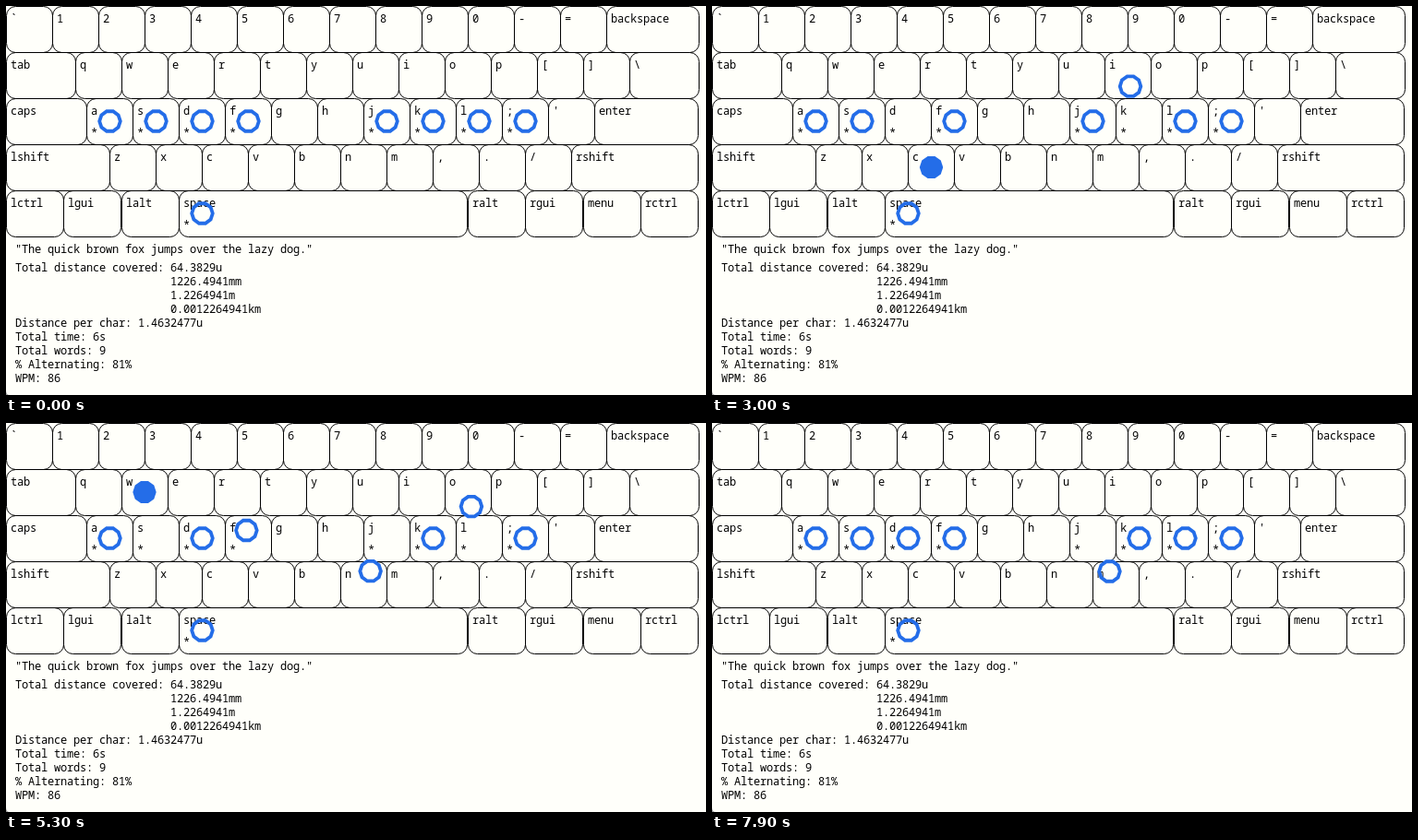
Write an HTML page with a canvas that moves like this. It is 758 px wide and 422 px high and loops after 8 s.

```html
<!DOCTYPE html>
<html lang="en">
<head>
<meta charset="utf-8">
<title>Typing simulation</title>
<style>
html, body { margin: 0; width: 758px; height: 422px; overflow: hidden; background: #fffffa; }
canvas { display: block; }
</style>
</head>
<body>
<canvas id="stage" width="758" height="422"></canvas>
<script>
const ctx = document.getElementById('stage').getContext('2d');
const LOOP = 8000, UNIT = 50, BLUE = '#246de8';

// Each row: key names; "name:width" when wider than one unit.
const rows = [
  '` 1 2 3 4 5 6 7 8 9 0 - = backspace:2',
  'tab:1.5 q w e r t y u i o p [ ] \\:1.5',
  "caps:1.75 a s d f g h j k l ; ' enter:2.25",
  'lshift:2.25 z x c v b n m , . / rshift:2.75',
  'lctrl:1.25 lgui:1.25 lalt:1.25 space:6.25 ralt:1.25 rgui:1.25 menu:1.25 rctrl:1.25'
];
const keys = {};
rows.forEach((row, r) => {
  let x = 0;
  for (const item of row.split(' ')) {
    const [name, size = 1] = item.split(':');
    const w = size * UNIT;
    keys[name] = { x, y: r * UNIT, w, cx: x + 25, cy: r * UNIT + 25 };
    x += w;
  }
});

const fingers = ['a', 's', 'd', 'f', 'j', 'k', 'l', ';', 'space'];
const reach = { a: 'q', s: 'wx', d: 'ec', f: 'rtb', j: 'hunm', k: 'i', l: 'o' };
const fingerOf = key => fingers.includes(key) ? key
  : key === 'rshift' ? ';' : fingers.find(f => (reach[f] || '').includes(key));
const handOf = f => f === 'space' ? 'thumb' : 'asdf'.includes(f) ? 'left' : 'right';

// Motion plan: speed in px/ms, times in ms.
const SPEED = 0.142, HOLD = 150, GAP = 188, LAG = 25, START = 46;

function makeMove(key) {
  const finger = fingerOf(key), home = keys[finger], to = keys[key];
  return { key, finger, home, to, travel: Math.hypot(to.cx - home.cx, to.cy - home.cy) / SPEED };
}
function schedule(move, start) {
  move.start = start;
  move.press = start + move.travel;
  release(move, move.press + HOLD);
}
function release(move, time) {
  move.release = time;
  move.end = time + move.travel;
}

function plan(text) {
  const shift = makeMove('rshift'), moves = [shift];
  schedule(shift, START);
  let prev = shift;
  for (const ch of text) {
    const move = makeMove(ch === ' ' ? 'space' : ch);
    const last = moves.filter(m => m.finger === move.finger).pop();
    const sameHand = handOf(prev.finger) === handOf(move.finger);
    let start;
    if (prev === shift) start = shift.press + LAG;
    else if (sameHand) start = prev.release + LAG;
    else start = prev.press + GAP - move.travel;
    // A finger must be back home before it sets off again.
    if (last && last.end > start) start = last.end + LAG;
    schedule(move, start);
    if (prev === shift) release(shift, move.press);
    moves.push(move);
    prev = move;
  }
  return moves;
}
const moves = plan('the quick brown fox jum');

function drawKey(name, k) {
  const x = Math.floor(k.x), w = Math.floor(k.w);
  ctx.beginPath();
  ctx.roundRect(x + 0.5, k.y + 0.5, w, UNIT, 10);
  ctx.stroke();
  ctx.fillText(name, x + 5, k.y + 18);
  if (fingers.includes(name)) ctx.fillText('*', x + 5, k.y + 42);
}

const stats = [
  'Total distance covered: 64.3829u',
  '1226.4941mm', '1.2264941m', '0.0012264941km',
  'Distance per char: 1.4632477u',
  'Total time: 6s',
  'Total words: 9',
  '% Alternating: 81%',
  'WPM: 86'
];

function drawBoard() {
  ctx.fillStyle = '#fffffa';
  ctx.fillRect(0, 0, 758, 422);
  ctx.fillStyle = ctx.strokeStyle = '#000';
  ctx.lineWidth = 1;
  ctx.font = '12px "Noto Sans Mono", "DejaVu Sans Mono", monospace';
  ctx.letterSpacing = '-0.2px';
  for (const name in keys) drawKey(name, keys[name]);
  ctx.fillText('"The quick brown fox jumps over the lazy dog."', 10, 268);
  stats.forEach((line, i) => ctx.fillText(line, i > 0 && i < 4 ? 178 : 10, 288 + i * 15));
  // Window corner
  ctx.fillStyle = '#999';
  ctx.beginPath();
  ctx.moveTo(0, 417);
  ctx.quadraticCurveTo(0, 422, 4, 422);
  ctx.lineTo(0, 422);
  ctx.fill();
}

function drawFinger(x, y, pressed) {
  const r = pressed ? 12.7 : 11.3, sides = 10;
  ctx.beginPath();
  for (let i = 0; i < sides; i++) {
    const a = i * 2 * Math.PI / sides;
    ctx.lineTo(x + r * Math.cos(a), y + r * Math.sin(a));
  }
  ctx.closePath();
  ctx.fillStyle = ctx.strokeStyle = BLUE;
  ctx.lineWidth = 3.8;
  pressed ? ctx.fill() : ctx.stroke();
}

function extent(m, t) {
  if (!m.travel) return 0;
  if (t < m.press) return (t - m.start) / m.travel;
  return t < m.release ? 1 : (m.end - t) / m.travel;
}

function draw(t) {
  drawBoard();
  for (const f of fingers) {
    const m = moves.find(m => m.finger === f && t >= m.start && t < m.end);
    const home = keys[f];
    if (!m) { drawFinger(home.cx, home.cy, false); continue; }
    const p = extent(m, t);
    drawFinger(home.cx + (m.to.cx - home.cx) * p, home.cy + (m.to.cy - home.cy) * p,
      t >= m.press && t < m.release);
  }
}

const begin = performance.now();
function frame() {
  // The picture advances in steps of 100 ms.
  const t = (performance.now() - begin) % LOOP;
  draw(Math.floor(t / 100) * 100);
  requestAnimationFrame(frame);
}
frame();
</script>
</body>
</html>
```
